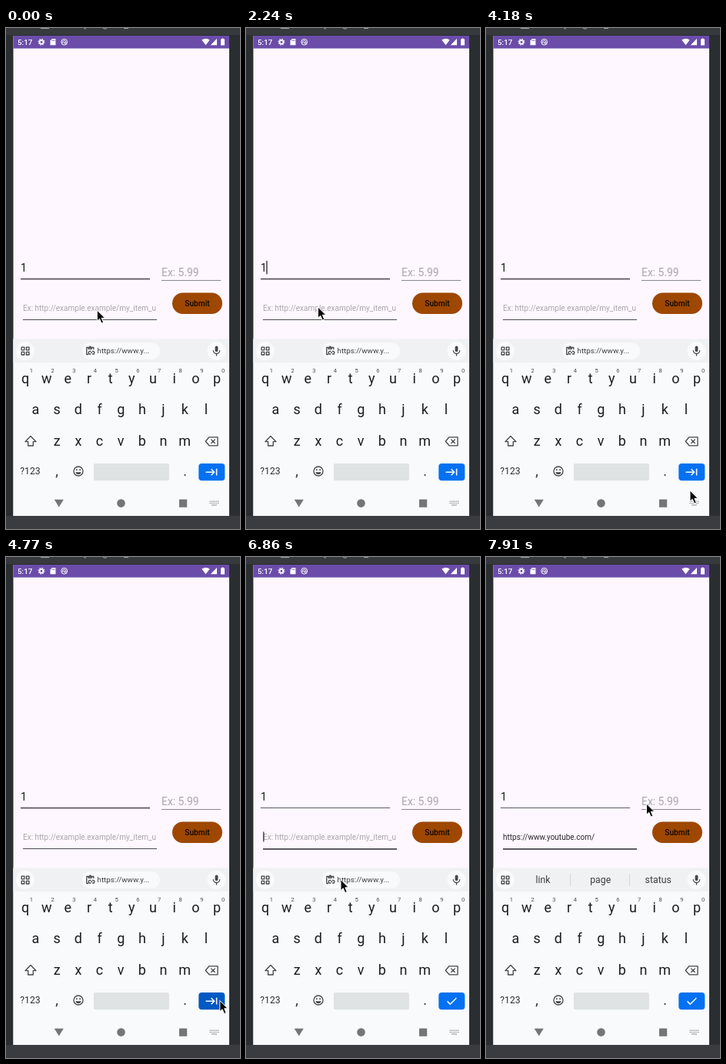
An HTML page for the animation above (8 s loop, 304 by 650 pixels).

```html
<!DOCTYPE html>
<html lang="en">
<head>
<meta charset="utf-8">
<title>Add item form</title>
<style>
html, body { margin: 0; width: 100%; height: 100%; overflow: hidden; background: #2b2e31; }
svg { display: block; width: 304px; height: 650px; font-family: Roboto, "Open Sans", sans-serif; }
.line { fill: none; stroke: #444746; stroke-width: 1.3; stroke-linejoin: round; }
.mid { text-anchor: middle; }
.hint { fill: #aaa5ab; }
</style>
</head>
<body>
<svg viewBox="0 0 304 650">
  <!-- window around the device -->
  <rect width="304" height="650" fill="#2b2e31"/>
  <rect width="304" height="9" fill="#37393c"/>
  <rect y="633" width="304" height="17" fill="#3a3c3f"/>
  <path d="M45 .5H56M101 0l3 1.5M126 0l3 1.5 2-1.5M153 .5h6" stroke="#a3a5a8" fill="none"/>

  <!-- status bar -->
  <rect x="9.5" y="10" width="280.5" height="623" fill="#fef7ff"/>
  <rect x="9.5" y="10" width="280.5" height="16.5" fill="#6b4da9"/>
  <text x="15" y="22" font-size="9.8" font-weight="500" fill="#fff">5:17</text>
  <g fill="none" stroke="#fff">
    <circle cx="46" cy="18.2" r="2.4" stroke-width="1.8"/>
    <circle cx="46" cy="18.2" r="3.8" stroke-width="1.2" stroke-dasharray="1.5 1.48"/>
    <circle cx="75.7" cy="18.2" r="3.9" stroke-width="1"/>
    <path d="M73.8 19.8a2.2 2.2 0 1 1 3.6 0M75.7 18v1.8h2.6" stroke-width="1"/>
  </g>
  <g fill="#fff">
    <path d="M59.8 14h4.7v8.2h-7v-5.8z"/>
    <path d="M254.3 15.6q5.2-3.6 10.4 0L259.5 22.3z"/>
    <path d="M274 13.8v8.4h-8.2z"/>
    <path d="M280.3 13.6h2.4v1h1.3v7.8h-5v-7.8h1.3z"/>
  </g>
  <path d="M60 15.2v1.8M61.6 15.2v1.8M63.2 15.2v1.8" stroke="#6b4da9" stroke-width=".7"/>

  <!-- form -->
  <text x="19" y="316" font-size="14" fill="#1d1b20">1</text>
  <rect id="nameLine" x="19" width="168" fill="#5f5a64"/>
  <rect id="nameCaret" x="26.4" y="302" width="1.3" height="17.5" fill="#2a2630"/>
  <text x="202" y="322" font-size="13.9" class="hint">Ex: 5.99</text>
  <rect x="202" y="327" width="77" height="1" fill="#8b8690"/>
  <text id="url" x="22" y="367" font-size="10"></text>
  <rect id="urlLine" x="22" width="174" fill="#4d4852"/>
  <rect id="urlCaret" y="356.5" width="1.2" height="13" fill="#2a2630"/>
  <rect x="216" y="343.5" width="65" height="27.5" rx="13.75" fill="#9e4700"/>
  <text x="248.5" y="361" font-size="10.2" font-weight="500" class="mid" fill="#120800">Submit</text>

  <!-- keyboard -->
  <rect x="9.5" y="403.5" width="280.5" height="229.5" fill="#f8fafb"/>
  <rect x="9.5" y="403.5" width="280.5" height="30.5" fill="#eff1f2"/>
  <circle cx="25" cy="419" r="12" fill="#f8fafb"/>
  <circle cx="273.5" cy="419" r="12" fill="#f8fafb"/>
  <path class="line" d="M20.2 414.2h3.6v3.6h-3.6zM26.4 414.2h3.6v3.6h-3.6zM20.2 420.4h3.6v3.6h-3.6zM26.4 420.4h3.6v3.6h-3.6z"/>
  <rect x="271.6" y="412.5" width="3.8" height="7.6" rx="1.9" fill="#444746"/>
  <path class="line" d="M269.3 418.2a4.2 4.2 0 0 0 8.4 0M273.5 422.4v3"/>
  <g id="chip">
    <rect x="99" y="408" width="101" height="22" rx="11" id="chipBg"/>
    <path class="line" d="M107 423.5h-2.2v-9h9v2.5M107.2 414.5v1.8h4v-1.8"/>
    <circle cx="109.3" cy="413.7" r="1.3" fill="#444746"/>
    <path class="line" stroke-width="1" d="M110.5 419.3h-1.3a1.9 1.9 0 0 0 0 3.8h1.3M112 419.3h.9a1.9 1.9 0 0 1 0 3.8h-.9M109.8 421.2h2.6"/>
    <text x="118.5" y="422.4" font-size="9.8" fill="#3c3f40">https://www.y...</text>
  </g>
  <g id="words" class="mid" font-size="12.3" fill="#3c3f40">
    <text x="74" y="423.3">link</text>
    <text x="148.7" y="423.3">page</text>
    <text x="223.7" y="423.3">status</text>
    <path d="M109.5 411v16M186.5 411v16" stroke="#d3d6d8"/>
  </g>
  <g id="keys" class="mid" font-size="18" fill="#1b1d1e"></g>
  <path class="line" d="M32 529.5l7 7.2h-3.7v5.3h-6.6v-5.3H25z"/>
  <path class="line" d="M264 530.8h11v11h-11l-4.8-5.5zM266.3 533.6l5.4 5.4M271.7 533.6l-5.4 5.4"/>
  <text x="31.5" y="579.2" font-size="12.2" class="mid" fill="#2b2d2e">?123</text>
  <text x="66" y="581" font-size="18" class="mid" fill="#2b2d2e">,</text>
  <text x="232.5" y="581" font-size="18" class="mid" fill="#2b2d2e">.</text>
  <circle class="line" cx="94" cy="575" r="6"/>
  <path d="M90.4 576.2h7.2a3.7 3.7 0 0 1-7.2 0z" fill="#444746"/>
  <circle cx="91.9" cy="573.3" r="1" fill="#444746"/>
  <circle cx="96.1" cy="573.3" r="1" fill="#444746"/>
  <rect x="114" y="565" width="98" height="22.3" rx="2" fill="#e0e3e3"/>
  <rect id="enter" x="250.3" y="565" width="34" height="22.3" rx="4"/>
  <path id="enterIcon" fill="none" stroke="#fff" stroke-width="1.5"/>

  <!-- navigation -->
  <g fill="#737576">
    <path d="M62.8 611.8h12l-6 9.8z"/>
    <circle cx="149.5" cy="616.6" r="5.3"/>
    <rect x="225" y="611.6" width="10.2" height="10.2"/>
  </g>
  <path d="M264.5 614.2h12M264.5 616.6h12" stroke="#a2a4a5" stroke-width="1.4" stroke-dasharray="1.4 .7"/>
  <path d="M267 619h7" stroke="#a2a4a5" stroke-width="1.2"/>

  <path id="mouse" d="M0 0V14.2L3.2 11.3 5.7 17 8.3 15.9 5.9 10.3H10.3Z" fill="#080808" stroke="#fff" stroke-width="1" stroke-linejoin="round"/>
</svg>
<script>
const LOOP = 8000;
const $ = id => document.getElementById(id);
const attr = (id, values) => {
  for (const k in values) $(id).setAttribute(k, values[k]);
};
const show = (id, on) => attr(id, { visibility: on ? "visible" : "hidden" });
const within = (t, spans) => spans.some(([a, b]) => t >= a && t < b);

function addText(x, y, text, style = {}) {
  const el = document.createElementNS("http://www.w3.org/2000/svg", "text");
  for (const [k, v] of Object.entries({ x, y, ...style })) el.setAttribute(k, v);
  el.textContent = text;
  $("keys").append(el);
}

const PITCH = 27.67;
[["qwertyuiop", 25, 461], ["asdfghjkl", 38.5, 501.3], ["zxcvbnm", 66.2, 541.8]].forEach(([row, x0, y]) =>
  [...row].forEach((c, i) => addText(x0 + i * PITCH, y, c)));
for (let i = 0; i < 10; i++) {
  addText(33 + i * PITCH, 447.3, (i + 1) % 10, { "font-size": 7.6, fill: "#4a4d4e" });
}

// pointer stops: time, x, y
const STOPS = [
  [0, 118.3, 366], [150, 118.3, 365.5], [740, 119, 378.5], [1040, 112, 373], [1190, 100, 366], [1340, 93.5, 362],
  [3440, 140, 470], [3590, 202.3, 575], [3740, 242, 613], [3890, 258, 612], [4040, 265, 600], [4190, 266, 588],
  [4330, 266.5, 580], [4480, 273, 578], [4630, 277, 576], [4770, 277.8, 575.5],
  [5070, 225, 515], [5220, 120, 405], [5370, 85.5, 367],
  [6270, 84.8, 366.5], [6420, 85.2, 366.8], [6710, 106, 399], [6860, 123, 418.5],
  [7610, 150, 385], [7760, 188, 338], [7910, 208.5, 320]
];
const NAME_BLINK = [[1340, 1790], [2240, 2840], [3290, 3740], [4330, 4770]];
const URL_BLINK = [[4930, 5370], [5970, 6420], [6860, 7310], [7460, 7910]];
const HINT = "Ex: http://example.example/my_item_u";
const ARROW = "M259.5 576.2h11M266.6 572.2l4 4-4 4M273.6 571.8v8.8";
const CHECK = "M261.5 576.4l3.8 3.8 8-8";

function draw(t) {
  const next = t >= 4930, pasted = t >= 7460;
  const [, x, y] = STOPS.findLast(s => s[0] <= t);
  attr("mouse", { transform: `translate(${x} ${y})` });

  attr("nameLine", next ? { y: 325, height: 1 } : { y: 324.7, height: 1.8 });
  attr("urlLine", next ? { y: 378, height: 1.8 } : { y: 378, height: 1 });
  show("nameCaret", within(t, NAME_BLINK));
  show("urlCaret", within(t, URL_BLINK));
  attr("urlCaret", { x: pasted ? 142.8 : 22.3 });

  $("url").textContent = pasted ? "https://www.youtube.com/" : HINT;
  attr("url", { fill: pasted ? "#29262d" : "#aaa5ab" });
  show("chip", !pasted);
  show("words", pasted);
  attr("chipBg", { fill: within(t, [[7310, 7460]]) ? "#e3e6e7" : "#f8fafb" });

  attr("enter", { fill: within(t, [[4770, 4930]]) ? "#0059c2" : "#0471f2" });
  attr("enterIcon", { d: next ? CHECK : ARROW });
}

function tick() {
  draw(performance.now() % LOOP);
  requestAnimationFrame(tick);
}
tick();
</script>
</body>
</html>
```
